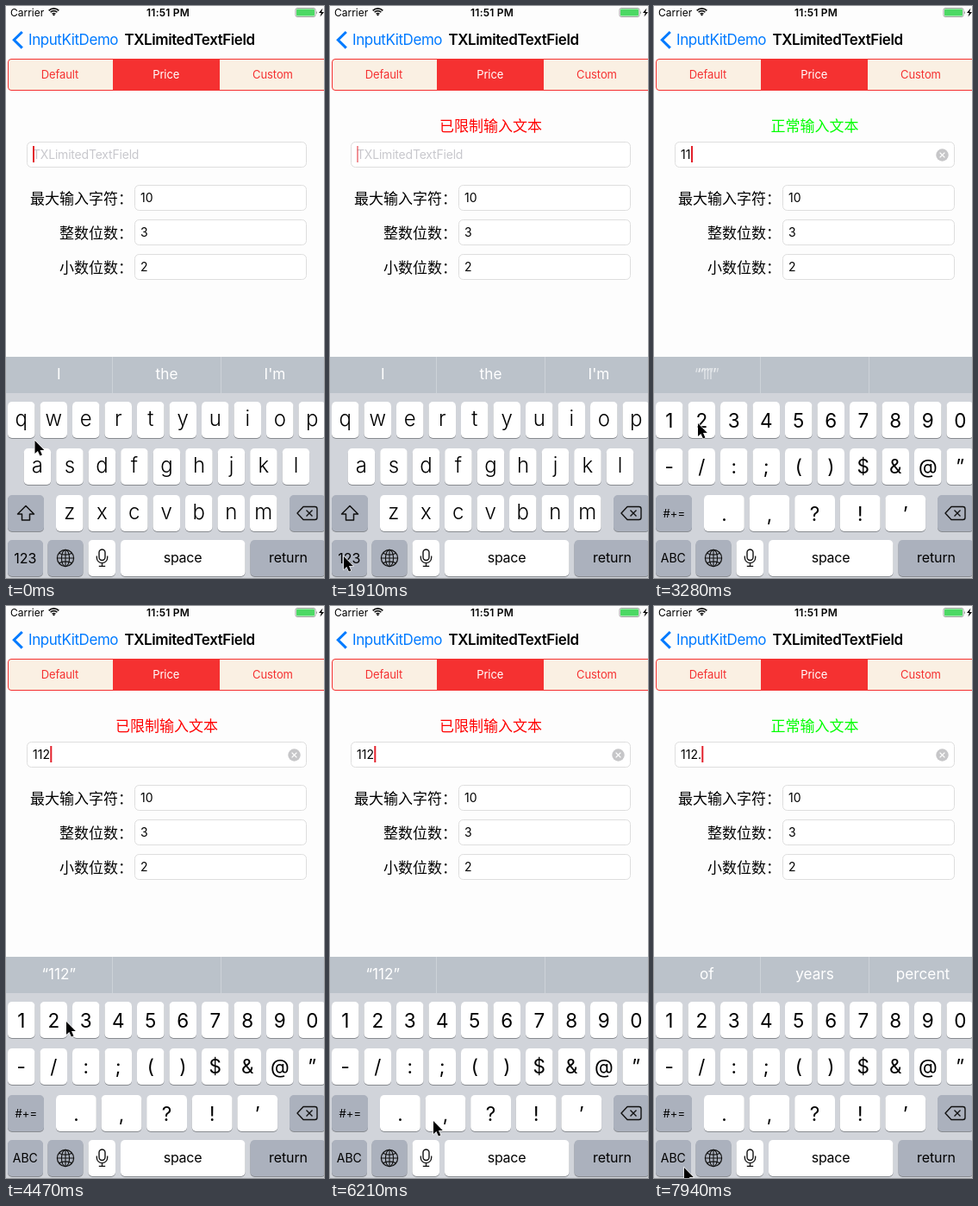
Write an HTML page that moves like this. It is 369x662 px and loops after 8 s.

```html
<!DOCTYPE html>
<html lang="zh-CN">
<head>
<meta charset="utf-8">
<title>Limited text field</title>
<style>
html, body { margin: 0; width: 100%; height: 100%; overflow: hidden; background: #fdfdfd; }
svg { display: block; width: 369px; height: 662px; }
text { font-family: Inter, "Noto Sans CJK SC", sans-serif; white-space: pre; }
.mid { text-anchor: middle; }
#pop path { filter: drop-shadow(0 0 1px rgba(0, 0, 0, .35)); }
</style>
</head>
<body>
<svg id="stage" viewBox="0 0 369 662" xmlns="http://www.w3.org/2000/svg"></svg>
<script>
const NS = 'http://www.w3.org/2000/svg';
const LOOP = 8000;
const stage = document.getElementById('stage');

function add(tag, attrs, parent = stage) {
  const el = document.createElementNS(NS, tag);
  for (const k in attrs) el.setAttribute(k, attrs[k]);
  parent.appendChild(el);
  return el;
}
function label(str, x, y, size, opts = {}, parent = stage) {
  const el = add('text', { x, y, 'font-size': size, ...opts }, parent);
  el.textContent = str;
  return el;
}
const MID = { class: 'mid' };
const line = (d, w, parent, color = '#111') =>
  add('path', { d, fill: 'none', stroke: color, 'stroke-width': w, 'stroke-linejoin': 'round' }, parent);

// Page
add('rect', { width: 369, height: 662, fill: '#fdfdfd' });

// Status bar
label('Carrier', 5, 11.5, 12);
[[2.7, 1.3], [5.4, 1.6], [8.1, 1.6]].forEach(([r, w]) => {
  const s = r * 0.72;
  line(`M${55.5 - s} ${11.2 - s}A${r} ${r} 0 0 1 ${55.5 + s} ${11.2 - s}`, w);
});
add('path', { d: 'M55.5 11.6L54 10A2.2 2.2 0 0 1 57 10Z' });
label('11:51 PM', 188, 11.5, 12, { ...MID, 'font-weight': 600, 'letter-spacing': .2 });
add('rect', { x: 336, y: 2.5, width: 23, height: 10, rx: 2, fill: 'none', stroke: '#8a8f8a', 'stroke-width': .8 });
add('rect', { x: 337, y: 3.5, width: 21, height: 8, rx: 1, fill: '#4cd964' });
add('path', { d: 'M360 5.5Q361.6 7.5 360 9.5Z', fill: '#8a8f8a' });
add('path', { d: 'M367.5 2.5L363 8H365.8L364.5 12.5L369 7H366.2Z' });

// Navigation bar
add('path', { d: 'M18.8 30L9.3 39.3L18.8 48.6', fill: 'none', stroke: '#007aff', 'stroke-width': 3 });
label('InputKitDemo', 26, 45, 17, { fill: '#007aff', 'letter-spacing': -.43 });
label('TXLimitedTextField', 137.5, 45, 17, { 'font-weight': 600, 'letter-spacing': -.43 });

// Segmented control
const RED = '#f53131';
add('rect', { x: 2.5, y: 61.5, width: 370, height: 36, rx: 3.5, fill: '#faf0e3', stroke: RED });
add('rect', { x: 124, y: 61, width: 124, height: 37, fill: RED });
[['Default', 62.5, RED], ['Price', 185.7, '#fff'], ['Custom', 309.5, RED]].forEach(([s, x, fill]) =>
  label(s, x, 84, 13, { ...MID, fill, 'letter-spacing': -.1 }));

// Form
const box = (x, y, width) =>
  add('rect', { x, y, width, height: 29, rx: 5, fill: '#fff', stroke: '#dedede' });
const notice = label('', 186.5, 144.8, 17, MID);
box(24.5, 157.5, 324);
const hint = label('TXLimitedTextField', 31, 177, 14, { fill: '#c8c8cd', 'letter-spacing': -.2 });
const typed = label('', 31, 177, 14);
const caret = add('rect', { y: 162, width: 2, height: 19, fill: '#e3212b' });
const clear = add('g', {});
add('circle', { cx: 334.5, cy: 172.5, r: 7.2, fill: '#c6c6c8' }, clear);
line('M331.6 169.6L337.4 175.4M337.4 169.6L331.6 175.4', 1.3, clear, '#fff');
[['最大输入字符：', '10'], ['整数位数：', '3'], ['小数位数：', '2']].forEach(([name, val], i) => {
  const y = 207.5 + 40 * i;
  label(name, 147, y + 21, 17, { 'text-anchor': 'end' });
  box(149.5, y, 199);
  label(val, 156, y + 19.5, 14);
});

// Keyboard
add('rect', { y: 406, width: 369, height: 256, fill: '#d1d4da' });
add('rect', { y: 406, width: 369, height: 42, fill: '#bbc2ca' });
[123.5, 249.5].forEach(x => add('rect', { x: x - .5, y: 406, width: 1, height: 42, fill: '#cdd2d8' }));
const words = [0, 1].map(() => {
  const g = add('g', { fill: '#fff' });
  return { g, parts: [61.3, 186.5, 312].map(x => label('', x, 431.7, 17.2, MID, g)) };
});

const keys = {};
function cap(x, y, w, fill, parent) {
  add('rect', { x, y: y + 1, width: w, height: 42, rx: 5, fill: '#888b90' }, parent);
  add('rect', { x, y, width: w, height: 42, rx: 5, fill }, parent);
}
function row(chars, x0, y, step, w, base, size, weight, parent) {
  [...chars].forEach((c, i) => {
    const x = x0 + step * i;
    cap(x, y, w, '#fff', parent);
    label(c, x + w / 2, base, size, { ...MID, 'font-weight': weight }, parent);
    keys[c] = { x, y, w };
  });
}
const GREY = '#abb1bd';
const letters = add('g', {}), digits = add('g', {});

row('qwertyuiop', 2, 458, 37.5, 31.5, 485.5, 24, 300, letters);
row('asdfghjkl', 20.7, 512, 37.5, 31.5, 539.5, 24, 300, letters);
row('zxcvbnm', 58, 566, 37.5, 31.5, 593.5, 24, 300, letters);
cap(2, 566, 42, GREY, letters);
line('M23 578.5L32.5 588H27.5V595H18.5V588H13.5Z', 1.5, letters);
cap(2, 618, 41, GREY, letters);
label('123', 22.3, 644.5, 16, MID, letters);

row('1234567890', 2, 458, 37.5, 31.5, 488, 22.5, 400, digits);
row('-/:;()$&@”', 2, 512, 37.5, 31.5, 541, 22.5, 400, digits);
row('.,?!’', 58, 566, 52.6, 46.8, 595.5, 22.5, 400, digits);
cap(2, 566, 42, GREY, digits);
label('#+=', 23.3, 592, 13, MID, digits);
cap(2, 618, 41, GREY, digits);
label('ABC', 22.3, 643.5, 14, MID, digits);

cap(329, 566, 42, GREY);
line('M345 579.5H358.5Q361 579.5 361 582V592Q361 594.5 358.5 594.5H345L338 587Z', 1.4);
line('M348.5 583.5L355.5 590.5M355.5 583.5L348.5 590.5', 1.4);
cap(48.5, 618, 41, GREY);
add('circle', { cx: 69, cy: 639, r: 9.6, fill: 'none', stroke: '#111', 'stroke-width': 1.2 });
add('ellipse', { cx: 69, cy: 639, rx: 4.6, ry: 9.6, fill: 'none', stroke: '#111', 'stroke-width': 1.1 });
line('M69 629.4V648.6M59.4 639H78.6M61.4 633.2Q69 637 76.6 633.2M61.4 644.8Q69 641 76.6 644.8', 1.1);
cap(95.5, 618, 31.5, '#fff');
add('rect', { x: 108, y: 629, width: 7, height: 12.5, rx: 3.5, fill: 'none', stroke: '#111', 'stroke-width': 1.4 });
line('M105.3 636.5V638.5A6.2 6.2 0 0 0 117.7 638.5V636.5M111.5 645V648.3M107.8 648.3H115.2', 1.3);
cap(133, 618, 144.5, '#fff');
label('space', 205, 644, 16, { ...MID, 'letter-spacing': -.25 });
cap(283.5, 618, 87.5, GREY);
label('return', 327.5, 644, 16, { ...MID, 'letter-spacing': -.1 });

// Enlarged key shown while pressed
const pop = add('g', { id: 'pop' });
const popShape = add('path', { fill: '#fff' }, pop);
const popChar = label('', 0, 0, 35, { ...MID, 'font-weight': 300 }, pop);
function showPop(c) {
  const { x, y, w } = keys[c], r = x + w, wing = w > 40 ? 25 : 18;
  const a = x < 10 ? x : x - wing, b = r + wing, top = y - 64, low = y - 18, end = y + 42;
  popShape.setAttribute('d',
    `M${a + 9} ${top}H${b - 9}Q${b} ${top} ${b} ${top + 9}V${low}` +
    `C${b} ${low + 12} ${r} ${low + 10} ${r} ${y + 6}V${end - 5}Q${r} ${end} ${r - 5} ${end}` +
    `H${x + 5}Q${x} ${end} ${x} ${end - 5}V${y + 6}C${x} ${low + 10} ${a} ${low + 12} ${a} ${low}` +
    `V${top + 9}Q${a} ${top} ${a + 9} ${top}Z`);
  popChar.textContent = c;
  popChar.setAttribute('x', (a + b) / 2);
  popChar.setAttribute('y', y - 27);
}

const pointer = add('path', {
  d: 'M0 0V15L3.4 11.9L5.9 17.5L8.4 16.4L6 11H10.8Z',
  stroke: '#fff', 'stroke-width': 1.2, 'paint-order': 'stroke'
});

// Timeline
const BAD = ['已限制输入文本', '#f00'], GOOD = ['正常输入文本', '#0f0'];
const presses = [['q', 380, 500], ['w', 1080, 1320], ['1', 2570, 2690], ['1', 2990, 3110],
  ['2', 3430, 3550], ['2', 3980, 4100], ['2', 4950, 5070], [',', 6090, 6160],
  ['?', 6510, 6690], ['.', 7090, 7210]];
const notices = [[0, ['', '#f00']], [500, BAD], [2690, GOOD], [4100, BAD], [7210, GOOD]];
const values = [[0, '', 31], [2690, '1', 37], [3110, '11', 43], [3550, '112', 51.3], [7210, '112.', 55.3]];
const hints = [[-200, 'I', 'the', 'I\'m'], [2750, '“1”', '', ''], [3230, '“11”', '', ''],
  [3640, '“112”', '', ''], [7260, '', '', ''], [7700, 'of', 'years', 'percent']];
const blinks = [[1850, 2220], [5480, 5850], [6480, 6850]];
const path = [[30, 33.5, 503], [300, 20, 479], [860, 20, 479], [940, 49, 481], [1320, 49, 481],
  [1490, 23, 644], [1740, 23, 644], [1880, 16, 637], [2130, 16, 637], [2430, 17, 481],
  [3120, 17, 481], [3270, 51, 483], [4250, 51, 483], [4450, 70, 481], [5080, 70, 481],
  [5210, 84, 481], [5430, 84, 481], [5690, 118, 613], [5850, 120, 596], [6280, 120, 596],
  [6480, 187, 591], [6790, 187, 591], [7000, 82, 590], [7640, 82, 590], [7930, 35, 650]];

const clamp = v => Math.max(0, Math.min(1, v));
const ease = v => v * v * (3 - 2 * v);
const indexAt = (list, t) => Math.max(0, list.findLastIndex(e => e[0] <= t));
const show = (el, on) => el.setAttribute('display', on ? 'inline' : 'none');

function pointAt(t) {
  const i = indexAt(path, t), [t0, x0, y0] = path[i], [t1, x1, y1] = path[i + 1] || [t0 + 1, x0, y0];
  const p = ease(clamp((t - t0) / (t1 - t0)));
  return [x0 + (x1 - x0) * p, y0 + (y1 - y0) * p];
}
function setWords(slot, entry, alpha) {
  slot.parts.forEach((el, i) => { el.textContent = entry[i + 1]; });
  slot.g.setAttribute('opacity', alpha);
}

function draw(t) {
  const [msg, color] = notices[indexAt(notices, t)][1];
  notice.textContent = msg;
  notice.setAttribute('fill', color);

  const [, text, caretX] = values[indexAt(values, t)];
  typed.textContent = text;
  show(hint, !text);
  show(clear, text);
  caret.setAttribute('x', caretX);
  caret.setAttribute('opacity', blinks.reduce((o, [a, b]) =>
    o * (1 - clamp((t - a) / 120) * clamp((b - t) / 120)), 1));

  const h = indexAt(hints, t), mix = clamp((t - hints[h][0]) / 100);
  setWords(words[0], hints[Math.max(0, h - 1)], 1 - mix);
  setWords(words[1], hints[h], mix);

  show(letters, t < 1950);
  show(digits, t >= 1950);
  const press = presses.find(([, a, b]) => t >= a && t < b);
  show(pop, press);
  if (press) showPop(press[0]);

  pointer.setAttribute('transform', `translate(${pointAt(t)})`);
}

function tick() {
  draw(performance.now() % LOOP);
  requestAnimationFrame(tick);
}
tick();
</script>
</body>
</html>
```
